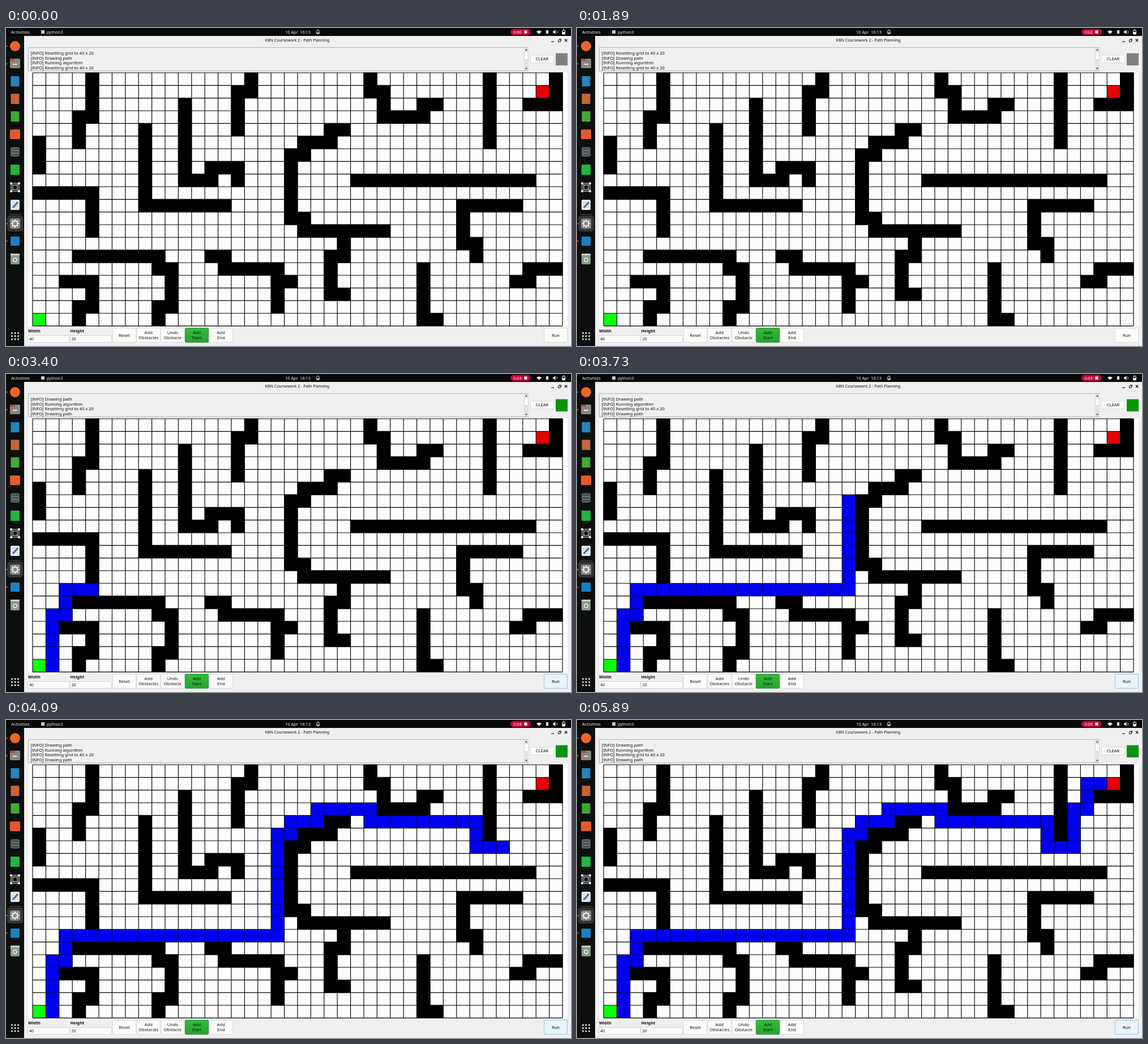
Animation of 998 by 561 pixels, one loop 6.47 s. Source, as an HTML page with a canvas:

```html
<!DOCTYPE html>
<html lang="en">
<head>
<meta charset="utf-8">
<title>Path Planning</title>
<style>
  html, body { margin: 0; width: 100%; height: 100%; overflow: hidden; background: #efefef; }
  canvas { display: block; }
</style>
</head>
<body>
<canvas id="stage" width="998" height="561"></canvas>
<script>
const ctx = document.getElementById('stage').getContext('2d');
const LOOP = 6470;
const GRID = { x: 47, y: 79, w: 23.4, h: 22.33, cols: 40, rows: 20 };
const FONT = '"Noto Sans", "Open Sans", sans-serif';
const MOVES = { R: [1, 0], L: [-1, 0], U: [0, -1], D: [0, 1] };

// Expands a start cell and steps such as "D3 L" into a list of cells.
function walk(x, y, steps) {
  const cells = [[x, y]];
  for (const step of steps.split(' ')) {
    const [dx, dy] = MOVES[step[0]];
    for (let i = +step.slice(1) || 1; i > 0; i--) cells.push([x += dx, y += dy]);
  }
  return cells;
}

const walls = [
  [4, 0, 'D3 L D2'], [16, 0, 'D L D3'], [25, 0, 'D R D2 R3 U R'],
  [34, 0, 'D5'], [39, 0, 'D2 L2'], [11, 2, 'D6 R2 U R2 D'],
  [8, 4, 'D6 R6'], [0, 5, 'D2'], [0, 9, 'R4 D3'],
  [23, 4, 'L D L2 D L D5 R D R6'], [24, 8, 'R13'], [36, 10, 'L4 D3 R D'],
  [23, 13, 'D L D3 R'], [3, 14, 'R6 D R D3 L D'], [13, 14, 'R D R4 D3'],
  [18, 16, 'R'], [2, 16, 'R2 D2 L D'], [29, 15, 'D4 R'], [39, 15, 'L2 D L']
].flatMap(w => walk(...w));

const route = walk(0, 19,
  'R U4 R U2 R16 U8 R U R2 U R4 D R8 D2 R2 U3 R U2 R').slice(1);

const LOG = ['Drawing path', 'Running algorithm', 'Resetting grid to 40 x 20'];

function rect(x, y, w, h, fill) {
  ctx.fillStyle = fill;
  ctx.fillRect(x, y, w, h);
}

function rounded(x, y, w, h, r, fill, stroke) {
  ctx.beginPath();
  ctx.roundRect(x, y, w, h, r);
  if (fill) { ctx.fillStyle = fill; ctx.fill(); }
  if (stroke) { ctx.strokeStyle = stroke; ctx.stroke(); }
}

function disc(x, y, r, fill) {
  ctx.fillStyle = fill;
  ctx.beginPath();
  ctx.arc(x, y, r, 0, Math.PI * 2);
  ctx.fill();
}

function line(color, width, ...pts) {
  ctx.strokeStyle = color;
  ctx.lineWidth = width;
  ctx.beginPath();
  pts.forEach(([x, y], i) => i ? ctx.lineTo(x, y) : ctx.moveTo(x, y));
  ctx.stroke();
  ctx.lineWidth = 1;
}

function poly(fill, ...pts) {
  ctx.fillStyle = fill;
  ctx.beginPath();
  pts.forEach(p => ctx.lineTo(...p));
  ctx.fill();
}

function label(str, x, y, size, { color = '#111', align = 'left', weight = 400 } = {}) {
  ctx.font = `${weight} ${size}px ${FONT}`;
  ctx.fillStyle = color;
  ctx.textAlign = align;
  ctx.fillText(str, x, y + size * 0.36);
}

function button(text, x, y, w, h, fill = '#fcfcfa', border = '#dcdcda') {
  rounded(x + 0.5, y + 0.5, w - 1, h - 1, 1.5, fill, border);
  const lines = text.split('\n');
  lines.forEach((s, i) => label(s, x + w / 2, y + h / 2 + (i - (lines.length - 1) / 2) * 8.8,
    7.6, { align: 'center' }));
}

function drawTopBar(seconds) {
  const white = '#eeeeee';
  rect(0, 0, 998, 14, '#080808');
  label('Activities', 9, 7, 7.9, { color: white });
  rect(62, 4, 6, 6, '#c8c8c8');
  label('python3', 72, 7, 7.3, { color: white });
  label('10 Apr', 493, 7, 7.4, { color: white });
  label('16:13', 538, 7, 7.4, { color: white, align: 'right' });

  // bell
  rounded(549, 3.5, 4, 5.5, [2, 2, 0, 0], null, white);
  line(white, 1, [547.5, 9], [554.5, 9]);
  rect(550, 10, 2, 1, white);

  rounded(891, 1.5, 36, 11, 5.5, '#c00537');
  label(`0:0${seconds}`, 896, 7, 7.4, { color: '#fff' });
  rect(915.5, 4.5, 5, 5, '#fff');

  // wireless, radio, sound, battery
  ctx.fillStyle = white;
  ctx.beginPath();
  ctx.moveTo(941.5, 10.5);
  ctx.arc(941.5, 10.5, 6, -Math.PI * 0.77, -Math.PI * 0.23);
  ctx.fill();
  rect(954, 4, 4, 6, white);
  poly(white, [966, 5.5], [968, 5.5], [970.5, 3], [970.5, 11], [968, 8.5], [966, 8.5]);
  ctx.strokeStyle = white;
  ctx.beginPath();
  ctx.arc(970.5, 7, 3, -0.9, 0.9);
  ctx.stroke();
  rounded(982.5, 4, 5, 7, 1, null, white);
  rect(984, 2.5, 2, 1.5, white);
  rect(983, 7, 4, 4, white);
}

function drawDock() {
  rect(0, 14, 32, 547, '#0c0f0e');
  rounded(2, 331, 28, 28, 5, '#343635');

  disc(16, 32, 9, '#ee6427');

  rounded(7, 54, 18, 17, 2, '#8a8580');
  rect(7, 54, 9, 4, '#a5514b');
  rect(12, 63, 8, 2, '#e5e2df');

  rect(8.5, 85, 15, 18, '#2484bd');
  rect(8.5, 116, 15, 18, '#c56437');
  rect(8.5, 147, 15, 18, '#43a737');
  rounded(7, 179, 18, 17, 2, '#e35a2b');

  // stacked disks
  for (let i = 2; i >= 0; i--) {
    rounded(8.5, 211 + i * 5, 15, 5, 2.3, '#444d50', '#858e91');
  }

  rect(8, 241, 16, 18, '#20b53b');

  // wire frame with knobs
  ctx.strokeStyle = '#eee';
  ctx.strokeRect(9, 274, 14, 14);
  ctx.strokeRect(12, 277, 8, 8);
  for (const x of [9, 23]) for (const y of [274, 288]) {
    line('#eee', 1, [x, y], [16 + Math.sign(x - 16) * 4, 281 + Math.sign(y - 281) * 4]);
    disc(x, y, 2, '#f4f4f4');
  }

  // notes and pencil
  rounded(8, 303, 16, 18, 2, '#e9edf1');
  for (let y = 307; y < 319; y += 3) line('#b5c0c9', 0.7, [10, y], [21, y]);
  line('#3d6f9f', 3, [12, 317], [21, 307]);

  rect(6, 328.5, 21, 1, '#5a5d5b');

  // gear
  rounded(7, 336, 18, 18, 3, '#858885');
  for (let i = 0; i < 8; i++) {
    const a = i * Math.PI / 4, c = Math.cos(a), s = Math.sin(a);
    line('#f3f3f3', 2, [16 + c * 4, 345 + s * 4], [16 + c * 7, 345 + s * 7]);
  }
  disc(16, 345, 5.3, '#f3f3f3');
  disc(16, 345, 3.5, '#858885');

  rect(8, 368, 16, 16, '#1681c8');

  // bin
  rounded(8, 398, 16, 19, 2, '#8c9a8d');
  rect(8, 398, 16, 3, '#c6cec6');
  disc(16, 409, 4, '#d8e5d8');
  disc(16, 409, 2, '#4c9256');

  for (const y of [32, 63, 345, 376]) disc(1.5, y, 1.2, '#d9522a');
  for (const x of [10.5, 16, 21.5]) for (const y of [538, 543.5, 549]) disc(x, y, 1.5, '#f0f0f0');
}

function drawLog(done) {
  rect(39, 34, 884, 42, '#f0f0f0');
  ctx.setLineDash([1, 1]);
  ctx.strokeStyle = '#777';
  ctx.strokeRect(39.5, 34.5, 883, 41);
  ctx.setLineDash([]);
  for (let i = 0; i < 4; i++) {
    label(`[INFO] ${LOG[(i + (done ? 0 : 2)) % 3]}`, 43.5, 44 + i * 8.87, 7.56);
  }
  rect(915, 35, 8, 40, '#e2e2e2');
  rounded(915.5, 41.5, 7, 14, 1, '#fcfcfc', '#d0d0d0');
  poly('#333', [917, 39.5], [921, 39.5], [919, 37]);
  poly('#333', [917, 70.5], [921, 70.5], [919, 73]);

  button('CLEAR', 926, 47.5, 42, 14.5);
  rect(971, 44.5, 21, 21.5, done ? '#079407' : '#808080');
}

function drawGrid(count) {
  const { x, y, w, h, cols, rows } = GRID;
  const cell = (c, r, fill) => rect(x + c * w, y + r * h, w, h, fill);
  rect(39, 78, 953, 448.5, '#fdfdfd');
  route.slice(0, count).forEach(([c, r]) => cell(c, r, '#0000f0'));
  cell(0, 19, '#0cff0c');
  cell(38, 1, '#e60000');

  for (let c = 0; c <= cols; c++) line('#000', 1.15, [x + c * w, y], [x + c * w, y + rows * h]);
  for (let r = 0; r <= rows; r++) line('#000', 1.15, [x, y + r * h], [x + cols * w, y + r * h]);

  // Route cells keep only a faint dark seam between them.
  ctx.globalAlpha = 0.45;
  const inRoute = new Set(route.slice(0, count).map(String));
  for (const [c, r] of route.slice(0, count)) {
    if (inRoute.has(`${c + 1},${r}`)) rect(x + (c + 1) * w - 0.7, y + r * h + 0.6, 1.4, h - 1.2, '#0000f0');
    if (inRoute.has(`${c},${r + 1}`)) rect(x + c * w + 0.6, y + (r + 1) * h - 0.7, w - 1.2, 1.4, '#0000f0');
  }
  ctx.globalAlpha = 1;

  ctx.fillStyle = '#000';
  for (const [c, r] of walls) ctx.fillRect(x + c * w - 0.5, y + r * h - 0.5, w + 1, h + 1);
}

function field(name, value, x) {
  label(name, x, 534, 7.3, { weight: 700 });
  rounded(x - 0.5, 542.5, 73.5, 12, 1, '#fdfdfd', '#d2d2d0');
  label(value, x + 2, 548.5, 7.2);
}

function drawControls(hover, pressed) {
  field('Width', '40', 39);
  field('Height', '20', 113.5);
  ['Reset', 'Add\nObstacles', 'Undo\nObstacle', 'Add\nStart', 'Add\nEnd'].forEach((text, i) => {
    const x = 188 + i * 42.7;
    if (i === 3) {
      const green = ctx.createLinearGradient(0, 529, 0, 555);
      green.addColorStop(0, '#32bd3c');
      green.addColorStop(1, '#26a430');
      button(text, x, 529, 42, 26, green, '#249030');
    } else {
      button(text, x, 529, 42, 26);
    }
  });
  button('Run', 950, 529, 42, 26);
  ctx.globalAlpha = hover;
  button('Run', 950, 529, 42, 26, pressed ? '#cbe3ee' : '#e8f4f8', '#9cc4d4');
  ctx.globalAlpha = 1;
}

function drawWindow() {
  rect(32, 14, 966, 547, '#efefef');
  label('KBN Coursework 2 - Path Planning', 514.5, 21.5, 7.05, { align: 'center' });
  rect(963, 23.5, 5, 1.2, '#222');
  ctx.strokeStyle = '#222';
  ctx.strokeRect(975.5, 21, 3.5, 3.5);
  line('#222', 1, [977, 19.5], [980.5, 19.5], [980.5, 23]);
  line('#222', 1.2, [986.8, 19.5], [991.3, 24]);
  line('#222', 1.2, [991.3, 19.5], [986.8, 24]);
}

function draw(t) {
  const seconds = [880, 1890, 2900, 3890, 4880, 5890].filter(s => t >= s).length;
  const tick = 100 / 3;
  const shown = 3760 + Math.floor((t - 3760 + 7) / tick) * tick;
  const count = Math.max(0, Math.min(route.length, Math.floor(10.2 + (shown - 3393) / 15.8)));
  const hover = t < 2640 ? 0 : Math.min(1, (1 + Math.floor((t - 2640) / 60)) / 3);

  drawWindow();
  drawLog(t >= 3225);
  drawGrid(count);
  drawControls(hover, t >= 3130 && t < 3225);
  drawDock();
  drawTopBar(seconds);
}

const start = performance.now();
function frame() {
  draw((performance.now() - start) % LOOP);
  requestAnimationFrame(frame);
}
frame();
</script>
</body>
</html>
```
